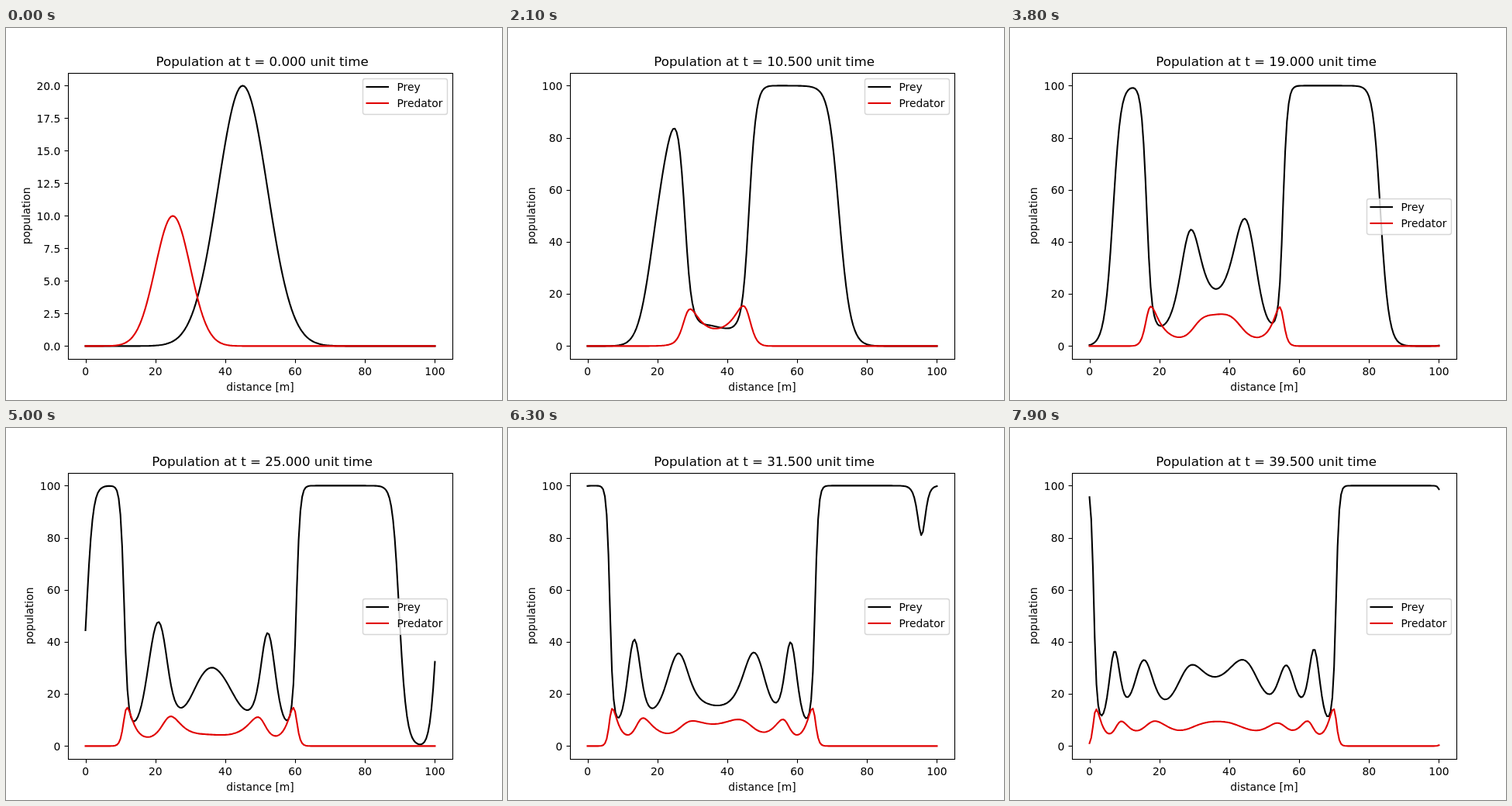
Recreate the animation shown at these times as an HTML page. Size 640 px wide and 480 px high, loop 8 s.

```html
<!DOCTYPE html>
<html lang="en">
<head>
<meta charset="utf-8">
<title>Predator and prey</title>
<style>
  html, body { margin: 0; width: 100%; height: 100%; overflow: hidden; background: #fff; }
  svg { display: block; width: 640px; height: 480px; }
  text { font: 13.889px "DejaVu Sans", sans-serif; fill: #000; }
  .mid { text-anchor: middle; }
  .end { text-anchor: end; }
  #title { font-size: 16.667px; }
  .axis { fill: none; stroke: #000; stroke-width: 1.11; }
  .line { fill: none; stroke-width: 2.083; stroke-linejoin: round; stroke-linecap: square; }
  .prey { stroke: #000; }
  .predator { stroke: #e00000; }
</style>
</head>
<body>
<svg viewBox="0 0 640 480">
  <path id="prey" class="line prey"/>
  <path id="predator" class="line predator"/>
  <rect class="axis" x="80.5" y="58.5" width="496" height="369"/>
  <g id="xTicks"></g>
  <g id="yTicks"></g>
  <text class="mid" x="328" y="468">distance [m]</text>
  <text class="mid" id="yLabel">population</text>
  <text class="mid" id="title" x="330.65" y="49"></text>
  <g id="legend">
    <rect x="460.5" y="65.5" width="109" height="46" rx="2.8" fill="#fff" fill-opacity=".8"
          stroke="#ccc" stroke-opacity=".8" stroke-width="1.39"/>
    <path class="line prey" d="M465.5 76H493"/>
    <path class="line predator" d="M465.5 97H493"/>
    <text x="504.4" y="81">Prey</text>
    <text x="504.4" y="102">Predator</text>
  </g>
</svg>
<script>
const $ = id => document.getElementById(id);
const FRAMES = 80, FRAME_MS = 100;
const N = 201, DX = 0.5, DT = 0.5;
const GROWTH = 1, CAPACITY = 100, HUNT = 0.1, FEED = 0.02, DEATH = 0.5, DIFFUSION = 0.1;

// Periodic reaction-diffusion model, advanced with explicit Euler steps.
const bump = (height, centre, width) =>
  Array.from({ length: N }, (_, i) => height * Math.exp(-((i * DX - centre) ** 2) / width));

const spread = (a, i) =>
  DIFFUSION * (a[(i + 1) % N] - 2 * a[i] + a[(i + N - 1) % N]) / (DX * DX);

const step = ({ u, v }) => ({
  u: u.map((p, i) => p + DT * (spread(u, i) + GROWTH * p * (1 - p / CAPACITY) - HUNT * p * v[i])),
  v: v.map((q, i) => q + DT * (spread(v, i) + FEED * u[i] * q - DEATH * q))
});

const states = [{ u: bump(20, 45, 100), v: bump(10, 25, 50) }];
while (states.length < FRAMES) states.push(step(states[states.length - 1]));

const BASE = 410.4, RISE = 336;
const xPos = x => 102.545 + x * 496 / 110;
const snap = p => Math.floor(p + 0.5) + 0.5;

const points = (values, top) => values.map((y, i) => [xPos(i * DX), BASE - RISE * y / top]);
const pathOf = pts => 'M' + pts.map(p => p[0].toFixed(2) + ' ' + p[1].toFixed(2)).join('L');

// The legend takes the first place that covers the least of the curves.
const BOX = { x: 460.06, y: 64.54, w: 109, h: 46 };
const PLACES = [[1, 0], [0, 0], [0, 1], [1, 1], [1, .5], [0, .5], [.5, 1], [.5, 0], [.5, .5]]
  .map(([fx, fy]) => [(fx - 1) * 373.12, fy * 309.72]);

function crosses([x1, y1], [x2, y2], cx, cy) {
  const dx = Math.abs(x1 - x2), dy = Math.abs(y1 - y2);
  return Math.abs(x1 + x2 - 2 * cx) < dx + BOX.w &&
    Math.abs(y1 + y2 - 2 * cy) < dy + BOX.h &&
    2 * Math.abs((x1 - cx) * (y1 - y2) - (y1 - cy) * (x1 - x2)) < BOX.w * dy + BOX.h * dx;
}

function overlap(pts, cx, cy) {
  const inside = pts.filter(([x, y]) =>
    Math.abs(x - cx) < BOX.w / 2 && Math.abs(y - cy) < BOX.h / 2).length;
  const hit = pts.some((p, i) => i > 0 && crosses(pts[i - 1], p, cx, cy));
  return inside + (hit ? 1 : 0);
}

function legendPlace(curves) {
  let best = PLACES[0], least = Infinity;
  for (const place of PLACES) {
    const cx = BOX.x + BOX.w / 2 + place[0], cy = BOX.y + BOX.h / 2 + place[1];
    const cost = curves.reduce((sum, pts) => sum + overlap(pts, cx, cy), 0);
    if (cost < least) { least = cost; best = place; }
  }
  return best;
}

function yTicks(top) {
  const stepSize = [2.5, 5, 10, 20].find(s => s >= top * 1.1 / 9);
  const digits = stepSize === 2.5 ? 1 : 0;
  let marks = '', label = '';
  for (let value = 0; value <= top * 1.05; value += stepSize) {
    const y = BASE - RISE * value / top;
    label = value.toFixed(digits);
    marks += `<path class="axis" d="M75.5 ${snap(y)}H80.5"/>` +
      `<text class="end" x="70.3" y="${Math.round(y + 5.2)}">${label}</text>`;
  }
  const width = 8.84 * label.replace('.', '').length + (digits ? 4.41 : 0);
  return { marks, labelX: Math.round(70.3 - width - 8.5) };
}

$('xTicks').innerHTML = [0, 20, 40, 60, 80, 100].map(value =>
  `<path class="axis" d="M${snap(xPos(value))} 427.5V432.4"/>` +
  `<text class="mid" x="${xPos(value)}" y="448">${value}</text>`).join('');

function render(index) {
  const { u, v } = states[index];
  const top = Math.max(...u, ...v);
  const prey = points(u, top), predator = points(v, top);
  $('prey').setAttribute('d', pathOf(prey));
  $('predator').setAttribute('d', pathOf(predator));
  $('title').textContent = `Population at t = ${(index * DT).toFixed(3)} unit time`;
  const { marks, labelX } = yTicks(top);
  $('yTicks').innerHTML = marks;
  $('yLabel').setAttribute('transform', `translate(${labelX} 242.4) rotate(-90)`);
  const [dx, dy] = legendPlace([prey, predator]).map(Math.round);
  $('legend').setAttribute('transform', `translate(${dx} ${dy})`);
}

const start = performance.now();
let shown = -1;
function tick() {
  const index = Math.floor((performance.now() - start) / FRAME_MS) % FRAMES;
  if (index !== shown) render(shown = index);
  requestAnimationFrame(tick);
}
tick();
</script>
</body>
</html>
```
